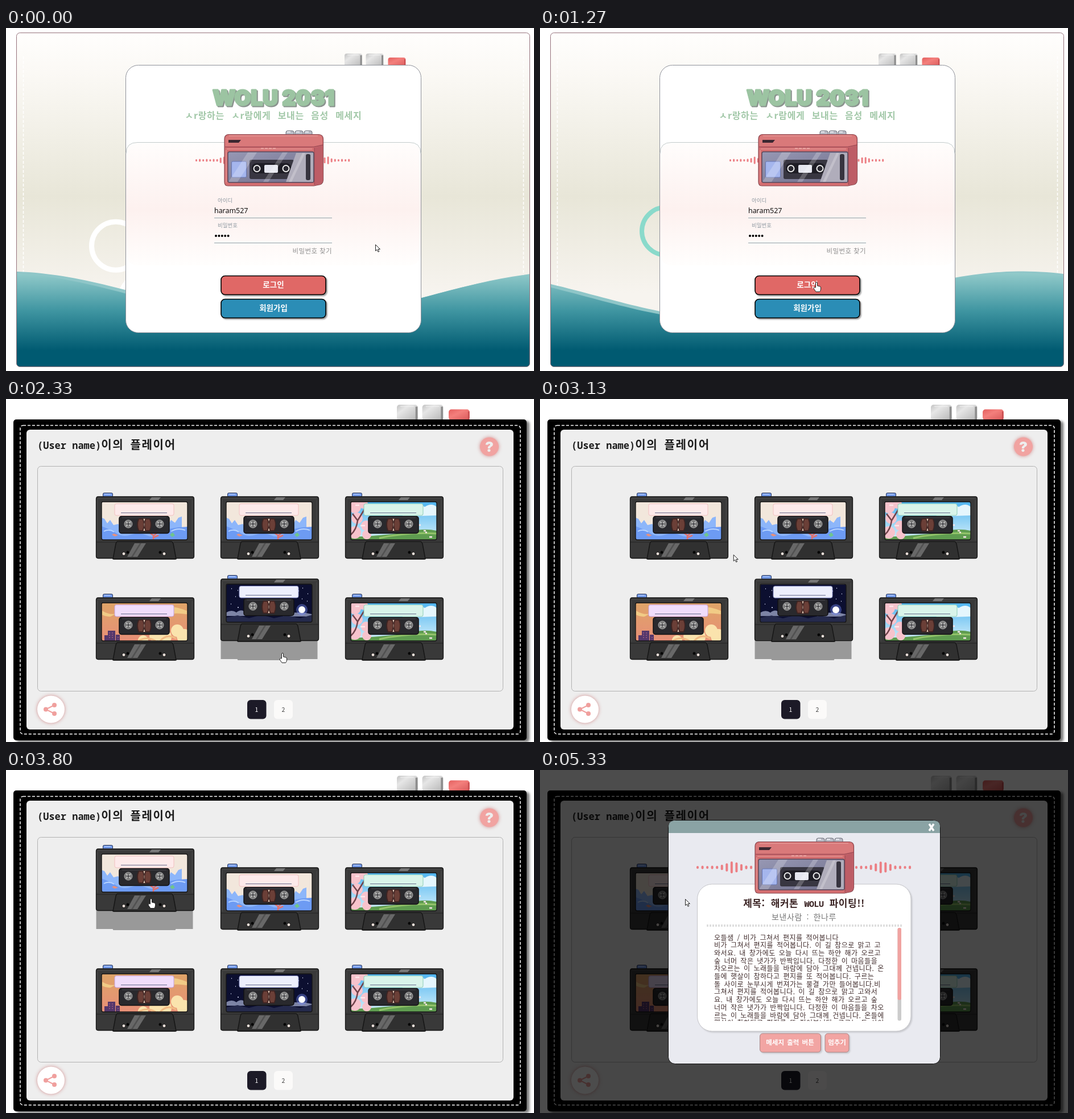
An HTML page for the animation above (5390 ms loop, 928 by 604 pixels).

```html
<!DOCTYPE html>
<html lang="ko">
<head>
<meta charset="utf-8">
<title>Cassette player</title>
<style>
html, body { margin: 0; width: 100%; height: 100%; overflow: hidden; background: #fff; }
svg { display: block; font-family: 'Noto Sans CJK KR', 'Noto Sans CJK', sans-serif; }
.mid { text-anchor: middle; }
.drop { filter: drop-shadow(2px 2px 1px #0006); }
.soft { filter: drop-shadow(2px 2px 1px #0002); }
.glow { filter: drop-shadow(0 0 3px #c77c); }
.latin { font-family: 'Noto Sans Mono', monospace; }
</style>
</head>
<body>
<svg id="stage" width="928" height="604" viewBox="0 0 928 604">
<defs>
  <linearGradient id="sky" x2="0" y2="1">
    <stop offset="0" stop-color="#fffefd"/><stop offset=".12" stop-color="#fbf9f5"/>
    <stop offset=".49" stop-color="#e8e6d8"/><stop offset=".78" stop-color="#f7f4ef"/>
  </linearGradient>
  <linearGradient id="sea" gradientUnits="userSpaceOnUse" x1="0" x2="0" y1="428" y2="568">
    <stop offset="0" stop-color="#96cdcc"/><stop offset=".5" stop-color="#3f95a1"/><stop offset="1" stop-color="#005a71"/>
  </linearGradient>
  <linearGradient id="blush" x2="0" y2="1">
    <stop offset="0" stop-color="#fffdfc"/><stop offset=".55" stop-color="#fdf1ef"/><stop offset="1" stop-color="#fffefd"/>
  </linearGradient>
  <linearGradient id="grey" x2="1" y2="1">
    <stop offset="0" stop-color="#c2c2c2"/><stop offset=".3" stop-color="#e6e6e6"/><stop offset="1" stop-color="#b4b4b4"/>
  </linearGradient>
  <linearGradient id="red" x2="1" y2="1">
    <stop offset="0" stop-color="#e4605f"/><stop offset=".4" stop-color="#f37f7c"/><stop offset="1" stop-color="#d95a5b"/>
  </linearGradient>
  <linearGradient id="spring-sky" x2="0" y2="1"><stop stop-color="#4fb4f0"/><stop offset="1" stop-color="#d5f0fa"/></linearGradient>
  <linearGradient id="dusk-sky" x2="0" y2="1"><stop stop-color="#dfa468"/><stop offset="1" stop-color="#e78f77"/></linearGradient>
  <linearGradient id="glass" x2="1" y2="1"><stop stop-color="#9798b4"/><stop offset="1" stop-color="#6f6e8a"/></linearGradient>
  <clipPath id="screen"><rect x="18.5" y="8.5" width="902" height="588" rx="6"/></clipPath>
  <clipPath id="letter"><rect x="300" y="284" width="322" height="158"/></clipPath>
  <clipPath id="window"><rect x="10" y="16" width="151" height="67" rx="3"/></clipPath>

  <g id="keys">
    <g fill="url(#grey)"><rect width="31" height="24" rx="4"/><rect x="37.5" width="31" height="24" rx="4"/></g>
    <path d="M29 3v20M66.500 3v20" stroke="#8d8d8d" stroke-width="3"/>
    <path d="M5 2.500h20M42.500 2.500h20" stroke="#f3f3f3"/>
    <rect x="76.500" y="7" width="31" height="16" rx="4" fill="url(#red)"/>
    <path d="M106 10v12" stroke="#c94f52" stroke-width="2"/>
  </g>

  <g id="recorder" stroke-linejoin="round">
    <g fill="#b9bcc6" stroke="#6a6c76">
      <rect x="492" y="181" width="14" height="9" rx="3"/><rect x="508" y="181" width="14" height="9" rx="3"/><rect x="524" y="181" width="14" height="9" rx="3"/>
    </g>
    <path d="M494 183h6m10 0h6m10 0h6" stroke="#eceef4" stroke-width="2"/>
    <path d="M390 187.500L550 187.500Q557 188 557.500 195V268Q557 276 548 276.500L541 278H390Q384 278 384 271V195Q384 189 390 187.500Z" fill="#d46e70" stroke="#8a4850" stroke-width="1.200"/>
    <path d="M385.500 205V196Q386 190 392 189H549Q555 189 556 196V205L541 208.500H386Z" fill="#d9797a"/>
    <path d="M542 211L556.500 207V268Q556 275 549 275.500L542 277Z" fill="#bd5d66"/>
    <path d="M385 209.500H541L557 206M542 211V276" fill="none" stroke="#a04e58" stroke-width="1.300"/>
    <path d="M392 190H548M388 213H538M387 215V272" fill="none" stroke="#e9a5a2"/>
    <path d="M391 197h22l-4 5h-18z" fill="#3b2730"/>
    <path d="M448 212h28" stroke="#f6c6c0" stroke-dasharray="5 2"/>
    <rect x="390" y="218" width="151" height="54" rx="3" fill="url(#glass)" stroke="#5a4a5c" stroke-width="1.500"/>
    <rect x="396.500" y="235" width="26" height="28" rx="2" fill="#a5b6ed" stroke="#6676b4"/>
    <rect x="428" y="232" width="78" height="34" rx="3" fill="#383641"/>
    <rect x="432" y="238" width="69" height="18" rx="8" fill="#1e1d25"/>
    <g fill="#2a2931" stroke="#eee" stroke-width="2"><circle cx="441" cy="247.500" r="5.500"/><circle cx="492" cy="247.500" r="5.500"/></g>
    <rect x="454" y="241" width="24" height="14" rx="2" fill="#e5e6ef"/>
    <path d="M510 220H540V271H492Z" fill="#b0adbb"/>
    <rect x="527" y="222" width="8" height="46" rx="3" fill="#37343f"/>
    <path d="M425 219h16l-34 52h-16zM486 219h9l-34 52h-9zM521 220h5l-24 51h-5z" fill="#fff" opacity=".22"/>
  </g>

  <path id="base" d="M1 20H171V115H141L140 117H31L30 115H1Z"/>
  <g id="art-sea">
    <path d="M10 16h151v67H10z" fill="#f2e7dc"/>
    <path d="M10 44l5 2 5 8 5-6 6 9 8-2 8 8 22 1 40-1 9-8 9 2 5-9 7 5 6-9 6-2v40H10z" fill="#8db6fa"/>
    <path d="M10 59q16 6 27 13t25 2 27 1 25-4 47-11v23H10z" fill="#6d9bf3"/>
    <path d="M14 68q9-5 18 1M132 68q12-7 25-2" fill="none" stroke="#b8d4ff" stroke-width="2"/>
    <path d="M101 83v-8l-6-4m6 5l6-5m-6 8l9-4" fill="none" stroke="#e2716c" stroke-width="2.500"/>
    <path d="M28 74l4-2 7 3-6 2z" fill="#e8907c"/><path d="M130 74l5-4 4 5-5 3z" fill="#6fc58d"/>
  </g>
  <g id="art-spring">
    <path d="M10 16h151v67H10z" fill="url(#spring-sky)"/>
    <path d="M100 42q5-12 17-10 9-16 23-7 12-8 21 0v15z" fill="#e5f6fd"/>
    <path d="M10 78q80-4 105-10t46-1v16H10z" fill="#5f9c50"/>
    <path d="M60 80q50-11 101-8" fill="none" stroke="#93c46a" stroke-width="3"/>
    <g fill="#f7c3cc"><circle cx="17" cy="25" r="11"/><circle cx="32" cy="20" r="8"/><circle cx="21" cy="45" r="10"/><circle cx="37" cy="58" r="9"/><circle cx="17" cy="70" r="11"/><circle cx="38" cy="74" r="8"/></g>
    <path d="M10 74q10-9 12-25l14-23M22 49l-9-12" fill="none" stroke="#70434b" stroke-width="2.500"/>
    <path d="M18 22h7m2 36h8m8 11h5m90-2h4m6 11h5m-24-21h4m8 13h3" stroke="#fde7ea" stroke-width="2.500"/>
  </g>
  <g id="art-dusk">
    <path d="M10 16h151v67H10z" fill="url(#dusk-sky)"/>
    <path d="M11 30q14 8 24 5l-9 5q-8 1-15-3zM120 24q14-4 40 6v6q-20-3-31 0z" fill="#f1cb86"/>
    <g fill="#fae3ad"><circle cx="83" cy="82" r="9"/><circle cx="103" cy="75" r="9"/><circle cx="120" cy="76" r="13"/><circle cx="143" cy="65" r="11"/><circle cx="155" cy="75" r="13"/></g>
    <path d="M75 83q14-9 30 0m8 0q12-14 28-4" fill="none" stroke="#f2ba83" stroke-width="3"/>
    <path d="M15 83V73h6v-8h13v18zm20 0V72h7v11z" fill="#54376b"/>
    <path d="M24 68v12m5-12v12m10-4v5" stroke="#a05c83" stroke-width="1.500" stroke-dasharray="2 2"/>
  </g>
  <g id="art-night">
    <path d="M10 16h151v67H10z" fill="#0c0f30"/>
    <path d="M19 24h1m6 14h1m-9 13h1m11-24h1m113-4h1m8 10h1m-11 9h1m-7-14h1m14 18h1M30 57h2" stroke="#dfe6ff" stroke-width="1.500"/>
    <path d="M10 66q10-6 18 0 9-8 17 1 11 0 16 5H10zM104 67q13-6 22 0 17-3 35 2v4h-50z" fill="#7d84a5"/>
    <path d="M10 75l20-4 20 5 22-6 22 6 22-5 24 5 21-6v13H10z" fill="#252a4c"/>
    <circle cx="143" cy="61" r="10" fill="#7890ff66"/><circle cx="143" cy="61" r="6" fill="#fff"/>
  </g>
  <g id="shell">
    <rect x="12.500" y=".5" width="17" height="7" rx="2" fill="#7299e8" stroke="#1e2a4d"/><path d="M15 2.500h11" stroke="#c1d6ff"/>
    <path d="M4 7H169Q172.500 7 172.500 11V112Q172.500 115.500 169 115.500H141L140 117H31L30 115.500H4Q.5 115.500 .5 112V11Q.5 7 4 7ZM12 16Q10 16 10 19V80Q10 83 13 83H158Q161 83 161 80V19Q161 16 158 16Z" fill="#393939" fill-rule="evenodd" stroke="#151515" stroke-width="1.300"/>
    <path d="M3 10H169M3 12V84M169 13V84" stroke="#4b4b4b" fill="none"/><path d="M98 8h16l-4 5H94z" fill="#777"/>
    <path d="M1 87H35M137 87H172" stroke="#222"/>
    <path d="M38 86H132Q135 86 136 90L141 116.500H30L35 90Q36 86 38 86Z" fill="#303030" stroke="#161616" stroke-width="1.500"/>
    <path d="M68 89h20l-15 24H55z" fill="#686868"/><path d="M77 89h3l-15 24h-3z" fill="#303030" opacity=".4"/>
    <rect x="41" y="41.500" width="88" height="30" rx="4" fill="#29292d" stroke="#101013" stroke-width="1.500"/>
    <path d="M46 44h78" stroke="#4d4d52"/>
    <path d="M75 45h20q5 11 0 23H75q-6-12 0-23z" fill="#3f2422"/>
    <path d="M76 47q-4 9 0 19h6q3-10 0-19zM94 47q4 9 0 19h-6q-3-10 0-19z" fill="#6b3f37"/>
    <path d="M83.500 46q4 10 0 21h3q-4-11 0-21z" fill="#e3ccb8"/>
    <g fill="#777" stroke="#a9a9a9"><circle cx="57" cy="55" r="7"/><circle cx="112" cy="55" r="7"/></g>
    <path d="M53 51l8 8m0-8l-8 8M108 51l8 8m0-8l-8 8" stroke="#bdbdbd" stroke-width="2"/>
    <g fill="#4a4a4e"><circle cx="57" cy="55" r="2"/><circle cx="112" cy="55" r="2"/></g>
    <g fill="#060606"><circle cx="56" cy="105" r="2.500"/><circle cx="113" cy="105" r="2.500"/></g>
    <g fill="#eadfd9" stroke="#111"><circle cx="49" cy="107.500" r="3"/><circle cx="120" cy="107.500" r="3"/></g>
  </g>
</defs>

<g id="login">
  <g clip-path="url(#screen)">
    <rect x="18" y="8" width="904" height="590" fill="url(#sky)"/>
    <path d="M30.500 50V590M909.500 50V590" stroke="#fff" stroke-width="1.500" stroke-dasharray="5 3"/>
    <circle id="ring1" r="42.500" fill="none" stroke="#fff" stroke-width="9"/>
    <circle id="ring2" r="42" fill="none" stroke-width="8"/>
    <path id="back" fill="#8fc6c8"/><path id="front" fill="url(#sea)"/>
  </g>
  <rect x="18.500" y="8.500" width="902" height="588" rx="6" fill="none" stroke="#96727c"/>
  <use href="#keys" x="595" y="45"/>
  <rect x="210.500" y="65.500" width="519" height="471" rx="22" fill="#fff" stroke="#8f929b"/>
  <rect x="211" y="201" width="518" height="217" rx="20" fill="url(#blush)"/>
  <path d="M211 221Q211 201.500 231 201.500H709Q729 201.500 729 221" fill="none" stroke="#c3cbcb"/>
  <text class="mid" x="470" y="136" font-family="Inter, sans-serif" font-weight="900" font-size="37" fill="#9cc4a2" stroke="#9cc4a2" stroke-width="3" stroke-linejoin="round" style="filter:drop-shadow(2px 2px 0 #8b938f)">WOLU 2031</text>
  <text class="mid" x="470" y="159.500" font-size="16" font-weight="700" letter-spacing=".7" word-spacing="7" fill="#a2c8a8">ㅅr랑하는 ㅅr람에게 보내는 음성 메세지</text>
  <g id="loginBars" fill="#ec7f84"></g>
  <use href="#recorder"/>
  <g fill="#8e98a0" font-size="9.500"><text x="372" y="307">아이디</text><text x="372" y="351">비밀번호</text></g>
  <text x="366" y="325.500" font-family="Open Sans, sans-serif" font-size="12.500">haram527</text>
  <path d="M369 366h22" stroke="#000" stroke-width="4" stroke-linecap="round" stroke-dasharray="0 5.400"/>
  <path d="M366 334.500H573M366 378.500H573" stroke="#8fa4ab"/>
  <text x="573" y="397" text-anchor="end" font-size="11.500" letter-spacing=".4" fill="#8f8f8f">비밀번호 찾기</text>
  <g class="drop" stroke="#000" stroke-width="1.600">
    <rect x="378" y="436.500" width="184" height="33" rx="7" fill="#e06866"/><rect x="378" y="477.500" width="184" height="33" rx="7" fill="#2b8db6"/>
  </g>
  <g class="mid" fill="#fff" font-size="13.500" font-weight="700"><text x="470" y="457">로그인</text><text x="470" y="498">회원가입</text></g>
</g>

<g id="player">
  <use href="#keys" transform="translate(687 10) scale(1.190)"/>
  <rect x="13" y="36" width="902" height="565" rx="5" style="filter:drop-shadow(5px 3px 2px #0008)"/>
  <rect x="25" y="46.500" width="879" height="543.500" rx="5" fill="none" stroke="#fff" stroke-width="1.500" stroke-dasharray="5 3"/>
  <rect x="36" y="54" width="856" height="528" rx="6" fill="#eee"/>
  <text x="55" y="88" font-size="17" font-weight="600" fill="#1d1d1d"><tspan class="latin">(User name)</tspan><tspan font-size="20" letter-spacing="1.700">이의</tspan><tspan dx="11" font-size="20" letter-spacing="1.700">플레이어</tspan></text>
  <circle class="glow" cx="849.500" cy="84" r="16.500" fill="#f1a3a1"/>
  <text class="mid" x="849.500" y="93" font-family="Inter, sans-serif" font-size="25" font-weight="900" fill="#eee">?</text>
  <rect x="55.500" y="118.500" width="818" height="396" rx="6" fill="none" stroke="#b2b2b2"/>
  <g id="tapes"></g>
  <circle class="glow" cx="79" cy="546.500" r="24" fill="#fff"/>
  <path d="M85 539L70 546.500L85 554" fill="none" stroke="#f0a09e" stroke-width="2"/>
  <g fill="#f0a09e"><circle cx="70" cy="546.500" r="4"/><circle cx="85" cy="539" r="4"/><circle cx="85" cy="554" r="4"/></g>
  <rect x="424" y="530" width="33.500" height="33.500" rx="6" fill="#1c1a27"/><rect x="471" y="530" width="33" height="33.500" rx="6" fill="#fbfaf9"/>
  <g class="mid" font-size="10.500"><text x="440.500" y="550.500" fill="#fff">1</text><text x="487.500" y="550.500" fill="#444">2</text></g>
</g>

<g id="modal">
  <rect width="928" height="604" opacity=".7"/>
  <rect x="225.500" y="88.500" width="478" height="429" rx="12" fill="#e9eaf0" stroke="#111"/>
  <path d="M226 111V100Q226 89 238 89H691Q703 89 703 100V111Z" fill="#8aa3a4"/>
  <path d="M684 95l8 12m0-12l-8 12" stroke="#fff" stroke-width="3.500"/>
  <rect x="276.500" y="201" width="375.500" height="259" rx="26" fill="#fff" stroke="#c4c4c8" class="soft"/>
  <g id="modalBars" fill="#ec7f84"></g>
  <use href="#recorder" x="-6" y="-61"/>
  <text class="mid" x="464" y="240.500" font-size="17" font-weight="700" letter-spacing=".5" word-spacing="5" fill="#3b2424">제목: 해커톤 <tspan class="latin" font-size="15" letter-spacing="-.5">WOLU</tspan> 파이팅!!</text>
  <text class="mid" x="464" y="264" font-size="14" font-weight="500" letter-spacing=".6" word-spacing="3" fill="#777">보낸사람 : 한나루</text>
  <path d="M293 274H636" stroke="#dedede" stroke-width="4" stroke-dasharray="3 2"/>
  <g id="lines" clip-path="url(#letter)" font-size="12" font-weight="500" letter-spacing=".5" word-spacing="2" fill="#402c2c"></g>
  <rect x="628.500" y="278" width="6.500" height="163.500" rx="3" fill="#ccc"/><rect x="628.500" y="278" width="6.500" height="127" rx="3" fill="#f0a3a1"/>
  <g class="soft" fill="#f2a5a3" stroke="#a98585"><rect x="386.500" y="464" width="107" height="33" rx="5"/><rect x="501" y="464" width="42" height="33" rx="5"/></g>
  <g class="mid" fill="#fff" font-size="11.500" font-weight="700"><text x="439.500" y="484" word-spacing="2">메세지 출력 버튼</text><text x="522" y="484">멈추기</text></g>
</g>

<g id="cursor" stroke="#222" stroke-linejoin="round" fill="#fff">
  <path id="arrow" d="M.5 .5V11.500L3 9.200L5 13.300L6.800 12.500L5 8.500H8.500Z"/>
  <path id="hand" d="M-1.500 9V1Q-1.500 -.5 0 -.5T1.500 1V6L6 7Q7.500 7.500 7.500 9V12Q7 15 5.500 16.500H-1L-4.500 11.500Q-5.500 9 -3.500 8.500Z"/>
</g>
</svg>
<script>
const LOOP = 5390, PLAYER_AT = 1870, MODAL_AT = 4200;
const $ = id => document.getElementById(id);
const set = (el, attrs) => Object.entries(attrs).forEach(([k, v]) => el.setAttribute(k, v));
const ramp = (t, start, length) => Math.min(1, Math.max(0, (t - start) / length));
const ease = p => 1 - (1 - p) ** 2.3;
const mix = (a, b, p) => a + (b - a) * p;
const show = (el, on) => el.style.display = on ? '' : 'none';

const labels = { sea: ['#fdeaea', '#f2c0c0'], spring: ['#d9f4ea', '#8dcdb7'], dusk: ['#f0ddfb', '#c5a0dc'], night: ['#edeffc', '#8d94cc'] };
$('tapes').innerHTML = ['sea', 'sea', 'spring', 'dusk', 'night', 'spring'].map((art, i) => `
  <g transform="translate(${158 + i % 3 * 219} ${i < 3 ? 165 : 343})">
    <use href="#base" x="-.5" fill="#999"/>
    <g class="tape"><g clip-path="url(#window)"><use href="#art-${art}"/></g><use href="#shell"/>
    <rect x="33" y="19.500" width="104" height="20.500" rx="3" fill="${labels[art][0]}" stroke="${labels[art][1]}"/>
    <path d="M44 35.500H125" stroke="#666b8c"/></g>
  </g>`).join('');
const tapes = document.querySelectorAll('.tape');

$('lines').innerHTML = `오들샘 / 비가 그쳐서 편지를 적어봅니다
비가 그쳐서 편지를 적어봅니다. 이 길 참으로 맑고 고
와서요. 내 창가에도 오늘 다시 뜨는 하얀 해가 오르고
숲 너머 작은 냇가가 반짝입니다. 다정한 이 마음들을
차오르는 이 노래들을 바람에 담아 그대께 건넵니다. 온
들에 햇살이 참하다고 편지를 또 적어봅니다. 구르는
돌 사이로 눈부시게 번져가는 물결 가만 들어봅니다.비
그쳐서 편지를 적어봅니다. 이 길 참으로 맑고 고와서
요. 내 창가에도 오늘 다시 뜨는 하얀 해가 오르고 숲
너머 작은 냇가가 반짝입니다. 다정한 이 마음들을 차오
르는 이 노래들을 바람에 담아 그대께 건넵니다. 온들에
햇살이 참하다고 편지를 또 적어봅니다. 구르는 돌 사이`
  .split('\n').map((line, i) => `<text x="306" y="${299.5 + i * 13.7}">${line}</text>`).join('');

// A row of rounded sound bars swelling around one peak
const bars = (x, y, step, count, width, peak, amp, spread) => Array.from({ length: count }, (_, i) => {
  const h = width + 1 + i % 2 + amp * Math.exp(-(((i - peak) / spread) ** 2));
  return `<rect x="${x + i * step - width / 2}" y="${y - h / 2}" width="${width}" height="${h}" rx="${width / 2}"/>`;
}).join('');

const wave = (trough, lift) => {
  let d = 'M0 604';
  for (let x = 0; x <= 940; x += 10) d += `L${x} ${474 - lift + 42.5 * Math.cos((x - trough) * Math.PI / 500)}`;
  return d + 'V604Z';
};

// time, x, y of the pointer tip
const path = [[0, 649, 381], [250, 649, 381], [1150, 486, 448], [2650, 486, 448], [3130, 340, 274], [3420, 263, 240], [3520, 263, 240], [3750, 255, 227], [LOOP, 255, 227]];
function pointer(t) {
  const i = path.findIndex(p => p[0] > t), [t0, x0, y0] = path[i - 1], [t1, x1, y1] = path[i];
  const p = ramp(t, t0, t1 - t0);
  return [mix(x0, x1, p), mix(y0, y1, p)];
}

function drawLogin(t) {
  const s = t / 1000, p = ramp(t, 0, 1270), trough = 485 - 118 * s;
  set($('front'), { d: wave(trough, 0) });
  set($('back'), { d: wave(trough + 12, 3) });
  set($('ring1'), { cx: 193, cy: 384 - 255 * s, opacity: 1 - ramp(t, 200, 1000) });
  set($('ring2'), { cx: 243 - 17.3 * s, cy: 476 - 93 * s, stroke: `rgb(${mix(255, 138, p)},${mix(255, 218, p)},${mix(255, 203, p)})` });
  const swell = 7 + 2 * Math.cos(s * 9);
  $('loginBars').innerHTML = bars(334.5, 233, 6.1, 9, 3, 8 - p, swell, 1.2) + bars(560, 233, 6.1, 8, 3, .7 + p, swell, 1.2);
}

function drawPlayer(t) {
  const lift = (up, down) => 33 * (ease(ramp(t, up, 400)) - ease(ramp(t, down, 420)));
  set(tapes[0], { transform: `translate(0 ${-lift(3220, 4230)})` });
  set(tapes[4], { transform: `translate(0 ${-lift(1860, 3130)})` });
}

function drawModal(t) {
  const amp = 11 + 4 * Math.cos((t - 5330) / 750 * 2 * Math.PI);
  $('modalBars').innerHTML = bars(277, 171.5, 8.55, 12, 4, 7.2, amp, 1.8) + bars(556, 171.5, 8.55, 12, 4, 5.3, amp, 1.8);
}

function frame(now) {
  const t = now % LOOP, login = t < PLAYER_AT, modal = t >= MODAL_AT;
  show($('login'), login);
  show($('player'), !login);
  show($('modal'), modal);
  if (login) drawLogin(t); else drawPlayer(t);
  if (modal) drawModal(t);
  const [x, y] = pointer(t);
  const hand = login ? x < 562 && y > 436 : !modal && (x > 377 || x < 331);
  set($('cursor'), { transform: `translate(${x} ${y})` });
  show($('hand'), hand);
  show($('arrow'), !hand);
  requestAnimationFrame(frame);
}
requestAnimationFrame(frame);
</script>
</body>
</html>
```
